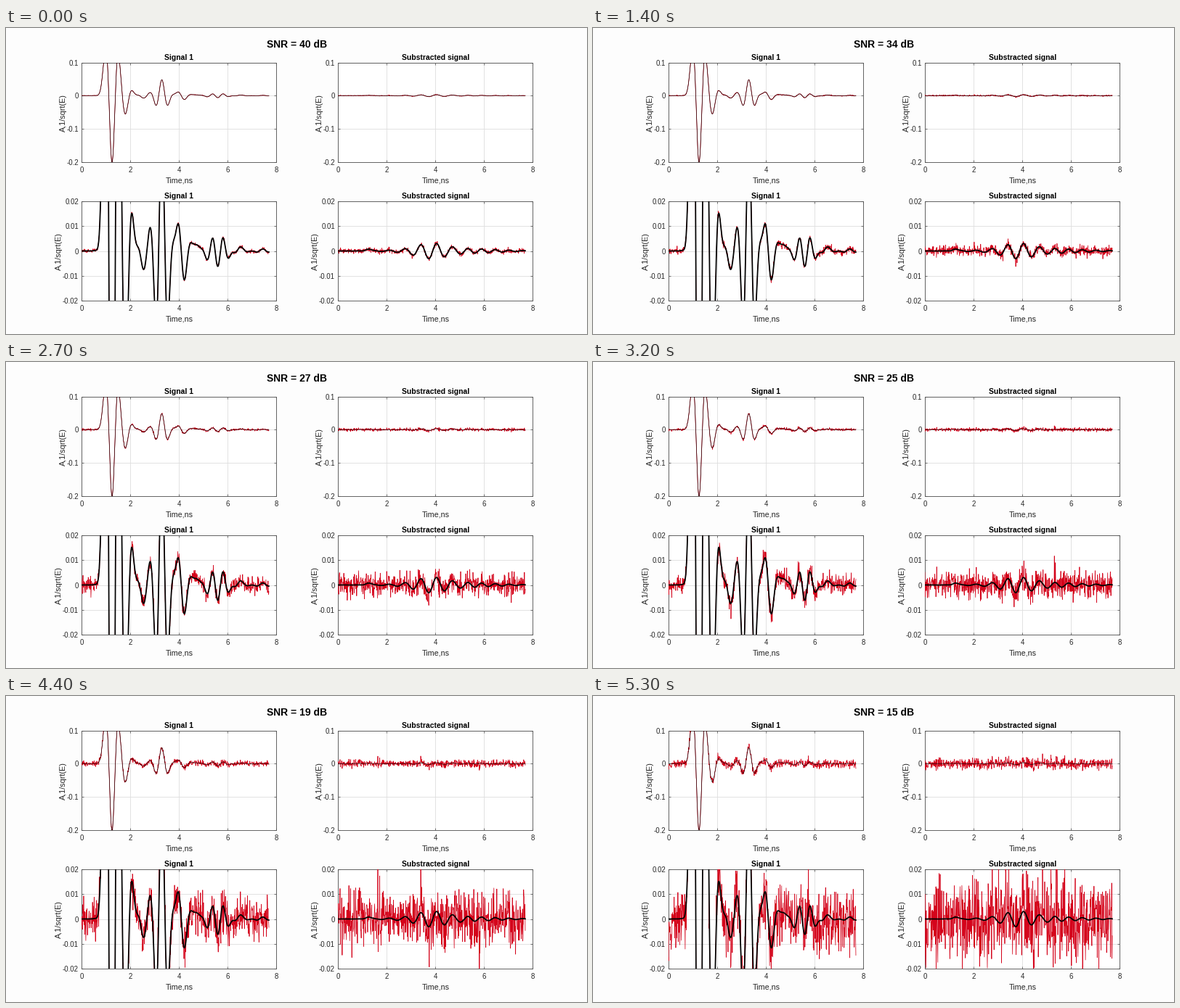
A matplotlib script for the animation above (5.4 s loop, 800 by 422 pixels).

```python
import numpy as np
import matplotlib.pyplot as plt
from matplotlib.animation import FuncAnimation

W, H, DPI = 800, 422, 100
PANEL_W, PANEL_H = 268, 137
FRAMES, INTERVAL = 54, 100
HOLD, PHASE = 2.08, 0.35        # frames per SNR level, sampling offset
INK, EDGE, GRID, RED = "#262626", "#555555", "#dfdfdf", "#d4041b"

plt.rcParams["font.family"] = "Liberation Sans"
fig = plt.figure(figsize=(W / DPI, H / DPI), dpi=DPI, facecolor="#fdfdfd")


def pt(px):
    return px * 72 / DPI


def label(x, y, text, size, **style):
    options = dict(ha="center", va="baseline", color=INK)
    options.update(style)
    return fig.text(x / W, 1 - y / H, text, fontsize=pt(size), **options)


def bell(t, centre, width):
    return np.exp(-((t - centre) / width) ** 2)


def ripple(t, centre, height, half, width=0.35, lead=0):
    """Wave packet: a cosine of the given half period under a bell."""
    return (height * bell(t, centre, width)
            * np.cos(np.pi * ((t - centre) / half + lead)))


def signal(t):
    pulse = (0.07 * bell(t, 0.94, 0.16) + ripple(t, 1.25, -0.19, 0.28, 0.28)
             + ripple(t, 1.68, 0.06, 0.29, lead=0.5))
    echo = (ripple(t, 2.55, -0.007, 0.3, 0.3) + ripple(t, 3.3, 0.048, 0.26)
            + ripple(t, 4.1, 0.013, 0.28, lead=0.5))
    tail = (ripple(t, 4.72, 0.0032, 0.42) + ripple(t, 5.6, -0.0062, 0.22, 0.5)
            + ripple(t, 6.38, -0.0022, 0.35, lead=0.5)
            + ripple(t, 7.45, 0.0008, 0.28))
    return pulse + echo + tail


def residue(t):
    envelope = 0.0022 * bell(t, 3.8, 0.8) + 0.0011 * bell(t, 4.6, 2.2)
    cycles = (t - 4.06) / 0.655 + 0.25 * np.maximum(t - 5.2, 0)
    return (envelope * np.cos(2 * np.pi * cycles)
            + 0.0008 * bell(t, 1.25, 0.15))


time = np.linspace(0, 7.7, 700)


def panel(left, top, title, curve, step, name_x, width):
    ticks = step
    low, high = ticks[0], ticks[-1]
    bottom, middle = top + PANEL_H, left + PANEL_W / 2
    ax = fig.add_axes([left / W, 1 - bottom / H, PANEL_W / W, PANEL_H / H])
    ax.set(xlim=(0, 8), ylim=(low, high), xticks=range(0, 9, 2), yticks=ticks)
    ax.grid(color=GRID, lw=pt(0.9))
    ax.set_axisbelow(True)
    ax.tick_params(direction="in", length=pt(3), width=pt(0.8), color=EDGE,
                   top=True, right=True, labelbottom=False, labelleft=False)
    for spine in ax.spines.values():
        spine.set(linewidth=pt(0.9), color=EDGE)

    for n in range(0, 9, 2):
        label(left + PANEL_W * n / 8, bottom + 14.5, str(n), 9.7)
    for v in ticks:
        y = bottom - PANEL_H * (v - low) / (high - low)
        label(left - 4, y + 4, f"{v:g}", 9.7, ha="right")
    label(middle + 0.5, bottom + 28.7, "Time,ns", 10.7)
    label(name_x, top + 69, "A,1/sqrt(E)", 10.8, rotation=90, va="center")
    label(middle + 0.5, top - 3.8, title, 10.4, weight="bold", color="black")

    noisy, = ax.plot([], [], color=RED, lw=pt(0.75), zorder=3)
    ax.plot(time, curve(time), color="black", lw=pt(width), zorder=4)
    return noisy


coarse = [n / 10 for n in range(-2, 2)]
fine = [n / 100 for n in range(-2, 3)]
signal_lines, residue_lines = [], []
for top, ticks, gap, width in [(47.6, coarse, 25.5, 0.6),
                               (239, fine, 31, 1.75)]:
    for left, title, curve, lines in [
            (104, "Signal 1", signal, signal_lines),
            (457, "Substracted signal", residue, residue_lines)]:
        lines.append(panel(left, top, title, curve, ticks, left - gap, width))

heading = label(400.5, 27, "", 13.9, weight="bold", color="black")


def update(frame):
    level = int((frame + PHASE) / HOLD)
    snr = 40 - level
    heading.set_text(f"SNR = {snr} dB")
    sigma = 0.0062 * 10 ** ((15 - snr) / 20)
    rng = np.random.default_rng(100 + level)
    first, second = rng.normal(0, sigma, (2, time.size))
    for line in signal_lines:
        line.set_data(time, signal(time) + first)
    for line in residue_lines:
        line.set_data(time, residue(time) + first - second)
    return [heading, *signal_lines, *residue_lines]


anim = FuncAnimation(fig, update, frames=FRAMES, interval=INTERVAL,
                     repeat=True, repeat_delay=0)
plt.show()
```
